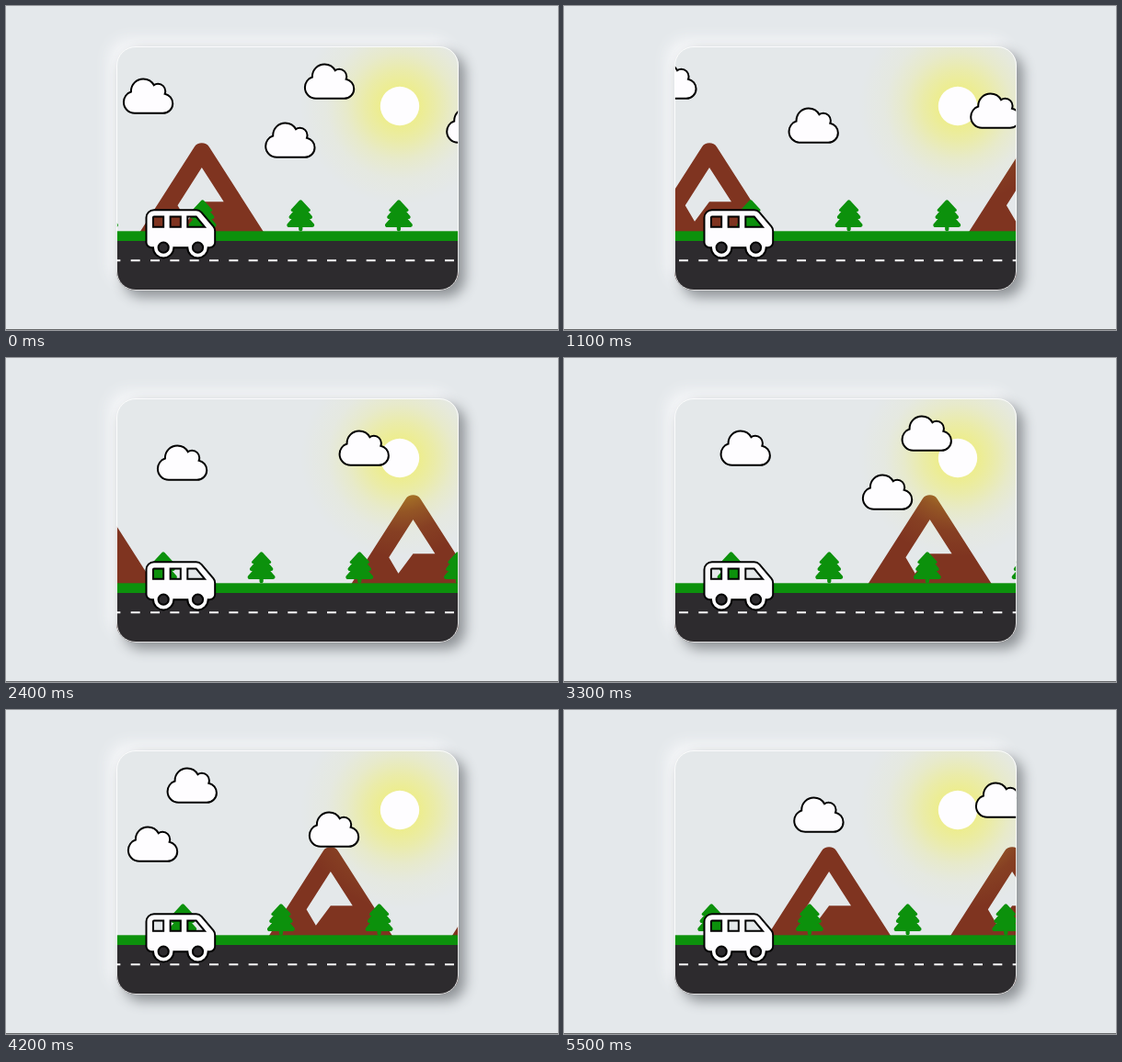
Animation of 600x353 px, one loop 5.6 s. Source, as an HTML page:

```html
<!DOCTYPE html>
<html lang="en">
<head>
<meta charset="utf-8">
<title>Road trip</title>
<style>
  html, body { margin: 0; width: 100%; height: 100%; overflow: hidden; background: #e4e8eb; }
  svg { position: absolute; left: 0; top: 0; display: block; }
  .card {
    position: absolute; left: 120px; top: 44px; width: 372px; height: 266px;
    border-radius: 21px; background: #e4e8ea;
    box-shadow: 7px 7px 14px #8d9195, -8px -8px 16px #f6f7f9;
  }
  .outlined { fill: #fefdff; stroke: #000; }
</style>
</head>
<body>
<div class="card"></div>
<svg width="600" height="353" viewBox="0 0 600 353">
  <defs>
    <clipPath id="frame"><rect x="120" y="44" width="372" height="266" rx="21"/></clipPath>
    <radialGradient id="glow" gradientUnits="userSpaceOnUse" cx="428" cy="109" r="108">
      <stop offset=".19" stop-color="#f6f232" stop-opacity=".5"/>
      <stop offset=".36" stop-color="#f6f232" stop-opacity=".35"/>
      <stop offset=".54" stop-color="#f6f23c" stop-opacity=".18"/>
      <stop offset=".74" stop-color="#f6f250" stop-opacity=".06"/>
      <stop offset="1" stop-color="#f6f250" stop-opacity="0"/>
    </radialGradient>
    <path id="mountain" fill="#7f3420" transform="translate(-85.33 138.7) scale(.33333)" d="M503.2 393.8L280.1 44.25c-10.42-16.33-37.73-16.33-48.15 0L8.8 393.8c-11.1 17.4-11.75 39.4-1.7 57.4C17 468 35.9 480 56.3 480h399.4c20.4 0 39.2-11 49.2-28.8C515 433 514 411 503.2 393.8zM256 111.8L327.8 224H256L208 288L177.2 235.3z"/>
    <path id="tree" fill="#0c910c" transform="translate(-14.93 211.2) scale(.06667)" d="M413.8 447L256 448v32c0 17.7-14.2 32-32 32s-32-14.3-32-32v-32H33c-28.500-43.7-34.5-24.7-56.400l69-79.600H62.200c-25.400-39.100-29.800-22.700-49.100z"/>
    <path id="cloud" class="outlined" stroke-width="24" transform="translate(0 -2.67) scale(.08333)" d="M96.2 200.1C96 197.4 96 194.7 96 192C96 103.6 167.6 32 256 32C315.3 32 367 64.25 394.7 112.2C409.9 101.1 428.3 96 448 96C501 96 544 138.1 544 192C544 204.2 541.7 215.8 537.6 226.6C596 238.4 640 290.1 640 352C640 422.7 582.7 480 512 480H144C64.5 480 0 415.5 0 336C0 273.2 40.2 219.8 96.2 200.1z"/>
  </defs>
  <g clip-path="url(#frame)">
    <g id="mountains"></g>
    <circle cx="428" cy="109" r="108" fill="url(#glow)"/>
    <circle cx="428" cy="109" r="21.2" fill="#fefdff"/>
    <g id="clouds"></g>
    <g id="trees"></g>
    <rect x="119" y="245.300" width="375" height="11" fill="#0c910c"/>
    <rect x="119" y="256" width="375" height="55" fill="#2d2b2e"/>
    <path id="dashes" d="M93 277.300H540" stroke="#fefdff" stroke-width="2" stroke-dasharray="10 11.3333"/>
    <path class="outlined" stroke-width="17" transform="translate(152.500 218.400) scale(.11667)" d="M592 384H576C576 437 533 480 480 480C426.100 480 384 437 384 384H256C256 437 213 480 160 480C106.100 480 64 437 64 384H48C21.500 384 0 362.500 0 336V104C0 64.200 32.200 32 72 32H465.100C483.100 32 501.900 40.300 514.100 54.800L624.800 186.500C634.600 198 640 212.600 640 227.700V336C640 362.500 618.500 384 592 384zM64 192H160V96H72C67.600 96 64 99.600 64 104zM545.100 192L465.100 96H384V192zM320 192V96H224V192zM480 336a48 48 0 1 0 0 96a48 48 0 1 0 0-96zM160 432a48 48 0 1 0 0-96a48 48 0 1 0 0 96z"/>
  </g>
  <rect x="120.500" y="44.500" width="371" height="265" rx="20.500" fill="none" stroke="#fff" stroke-opacity=".85"/>
  <rect y="352" width="600" height="1" fill="#66686a"/>
</svg>
<script>
  const LOOP = 5600, STEP = 100;
  const TILE = 320 / 3;               // distance the road travels in one second
  const CLOUD_CYCLE = 7 * TILE;
  const byId = id => document.getElementById(id);

  // Three tiers, each with rounded lower corners, above a short trunk.
  byId("tree").setAttribute("d",
    "M414 447L256 448V480C256 498 242 512 224 512C206 512 192 498 192 480V448H33" +
    "C4.500 448-10.700 413.500 8.300 391.600L77.300 312H62.200C36.800 312 23 282.200 39.500 262.900" +
    "L100 192H89.200C67.900 192 56.300 169.500 69.900 154.700L204.700 8.200C215.100-3.100 232.900-3.100 243.300 8.200" +
    "L378.200 154.700C391.800 169.500 380.200 192 358.900 192H348.100L408.500 262.900" +
    "C425 282.200 411.200 312 385.800 312H370.600L439.600 391.600C458.700 413.700 443.100 447 414 447z");

  function place(layer, shape, x, y = 0) {
    const use = document.createElementNS("http://www.w3.org/2000/svg", "use");
    use.setAttribute("href", "#" + shape);
    use.setAttribute("x", x);
    use.setAttribute("y", y);
    byId(layer).append(use);
  }

  for (const x of [212.8, 562, 761]) place("mountains", "mountain", x);
  for (let i = -1; i < 5; i++) place("trees", "tree", 213.6 + i * TILE);
  for (let cycle = 0; cycle < 3; cycle++)
    for (const [x, y] of [[127.9, 79.5], [282.2, 127.5], [324.9, 63.5], [479.2, 111.5], [676.9, 95.5]])
      place("clouds", "cloud", x + cycle * CLOUD_CYCLE, y);

  const shift = (id, x) => byId(id).setAttribute("transform", `translate(${-x})`);

  function draw(now) {
    const seconds = Math.floor(now % LOOP / STEP) * STEP / 1000;
    const road = seconds * TILE;
    shift("mountains", seconds * 49.8);
    shift("clouds", road * 2);
    shift("trees", road % TILE);
    shift("dashes", road % (TILE / 5));
  }

  const start = performance.now();
  function tick() {
    draw(performance.now() - start);
    requestAnimationFrame(tick);
  }
  draw(0);
  requestAnimationFrame(tick);
</script>
</body>
</html>
```
